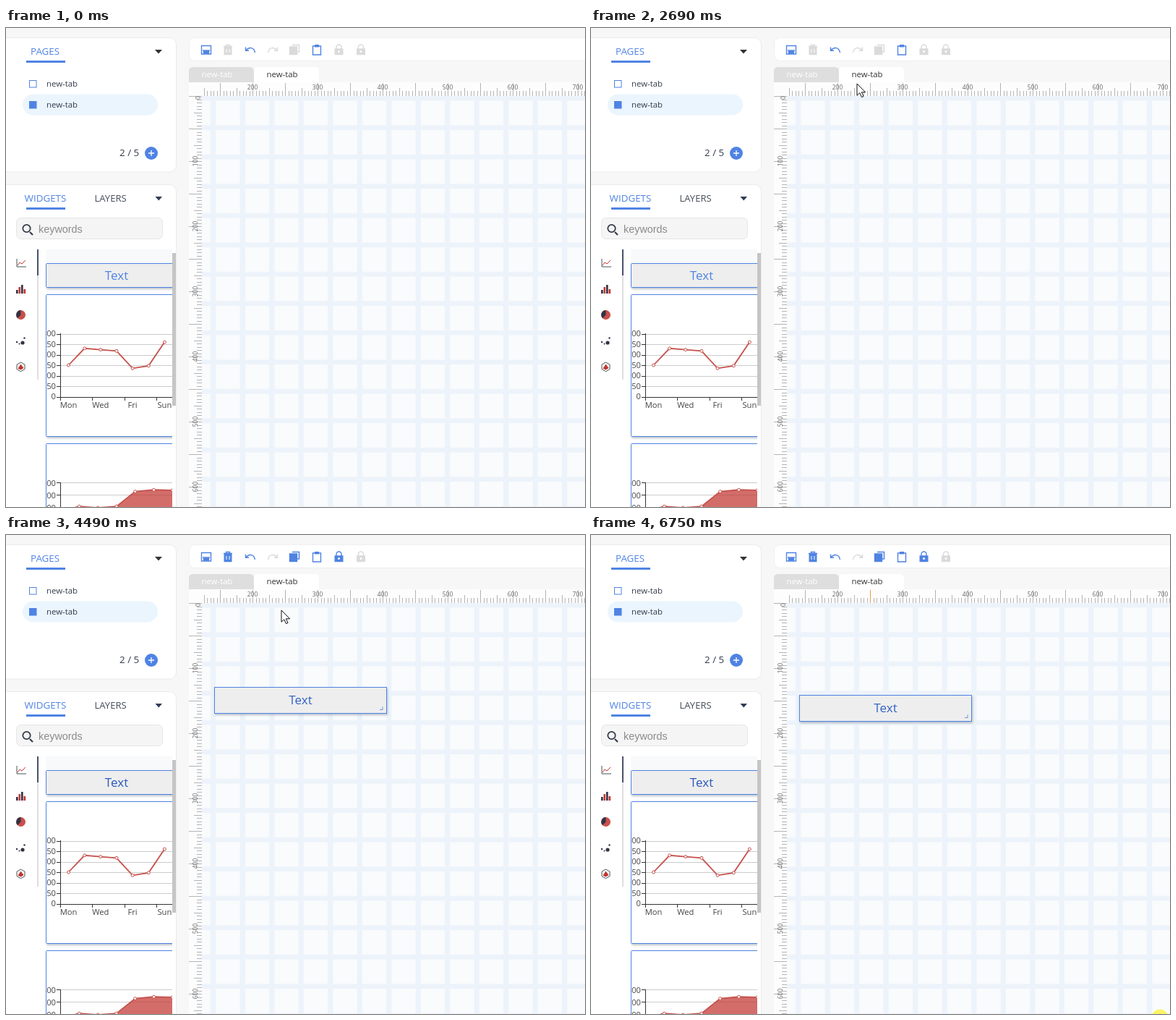
An HTML page that plays this animation: 801x662 px, repeating every 6880 ms.

```html
<!DOCTYPE html>
<html lang="en">
<head>
<meta charset="utf-8">
<title>Dashboard editor</title>
<style>
  html, body { margin: 0; width: 100%; height: 100%; overflow: hidden; background: #f7f7f7; }
  svg { display: block; position: absolute; left: 0; top: 0; }
  text { font-family: "Open Sans", "Noto Sans", "Noto Sans CJK TC", "Noto Sans CJK JP", sans-serif; }
  .crisp { shape-rendering: crispEdges; }
  .off { display: none; }
  .icon { fill: none; stroke: currentColor; stroke-width: 1.4; }
  .tool { color: #4f83e3; }
  .dim { color: #dadada; }
</style>
</head>
<body>
<svg id="stage" width="801" height="662" viewBox="0 0 801 662">
  <defs>
    <pattern id="grid" x="290.3" y="100.5" width="40.5" height="40.5" patternUnits="userSpaceOnUse">
      <rect width="40.5" height="40.5" fill="#edf3fa"/>
      <rect width="33.4" height="34" fill="#f9fbfd"/>
    </pattern>
    <clipPath id="listClip"><rect x="55" y="300" width="175" height="362"/></clipPath>
    <clipPath id="lineClip"><rect x="331" y="182" width="234" height="195"/></clipPath>
    <clipPath id="barClip"><rect x="331" y="386" width="234" height="153"/></clipPath>
    <filter id="shadow" x="-10%" y="-20%" width="120%" height="160%">
      <feDropShadow dx="1" dy="2" stdDeviation="1.5" flood-color="#456" flood-opacity=".35"/>
    </filter>
  </defs>
  <g id="panels"></g>
  <g id="list" clip-path="url(#listClip)"></g>
  <g id="tools"></g>
  <g id="tabs"></g>
  <g id="canvas"></g>
  <g id="rulers" class="crisp"></g>
  <g id="page1">
    <g id="charts"></g>
  </g>
  <g id="widget"></g>
  <g id="ghost" opacity=".6"></g>
  <circle id="halo" r="11.5" fill="#fdf23c" opacity=".78"/>
  <path id="arrow" d="M0 0V16.2L3.8 12.7L6.5 18.6L9 17.5L6.4 11.8H11.6Z" fill="#fff" stroke="#111" stroke-linejoin="round"/>
  <path id="hand" d="M-2 1Q0-2 2 1V7Q4 5.500 5 8Q7 6.500 8 9Q10.500 8 10.500 11V15Q9.500 17 8.500 21H-1Q-3 17-6 13Q-6.500 9.500-2 13Z" fill="#fff" stroke="#111" stroke-width="1.2" stroke-linejoin="round"/>
</svg>
<script>
const LOOP = 6880;
const BLUE = '#4f83e3';
const COLORS = ['#c23531', '#2f4554', '#61a0a8', '#d48265', '#91c7ae'];
const $ = id => document.getElementById(id);
const range = n => Array.from({ length: n }, (_, i) => i);
const mix = (a, b, p) => a + (b - a) * p;

const text = (s, x, y, size, fill, more = '') =>
  `<text x="${x}" y="${y}" font-size="${size}" fill="${fill}" ${more}>${s}</text>`;
const mid = 'text-anchor="middle"', end = 'text-anchor="end"';
const rect = (x, y, w, h, fill, more = '') =>
  `<rect x="${x}" y="${y}" width="${w}" height="${h}" fill="${fill}" ${more}/>`;
const line = (x1, y1, x2, y2, stroke, more = '') =>
  `<path d="M${x1} ${y1}L${x2} ${y2}" stroke="${stroke}" ${more}/>`;
const path = (d, more = '') => `<path d="${d}" ${more}/>`;
const poly = (pts, color, r, width = 1.8) =>
  `<polyline points="${pts.join(' ')}" fill="none" stroke="${color}" stroke-width="${width}"/>` +
  pts.map(([x, y]) => `<circle cx="${x}" cy="${y}" r="${r}" fill="#fff" stroke="${color}"/>`).join('');
const icon = (x, y, d, more = 'class="icon"') =>
  `<g transform="translate(${x} ${y})" ${more}>${d}</g>`;

const TRASH = path('M-6-4.500H6M-2.500-4.500V-6.500H2.500V-4.500') +
  path('M-4.800-3.500H4.800V6.500H-4.800Z', 'fill="currentColor"') +
  path('M-2-1V4M2-1V4', 'stroke="#fff" stroke-width="1"');
const LOCK = path('M-3.500-1V-3.500A3.500 3.500 0 0 1 3.500-3.500V-1') +
  rect(-5.3, -1, 10.6, 7.5, 'currentColor') + `<circle cy="2.600" r="1.500" fill="#fff" stroke="none"/>`;
const UNDO = path('M-6.500-3.500L-6.500 1.200L-2 1.200M-6 1C-2-4 5-4 6.500 4');

function pageRow(id, y) {
  return `<g id="${id}">` +
    rect(23, y - 14.5, 187, 29, '#ebf5fe', 'rx="14.5" class="bg"') +
    rect(32.5, y - 4.5, 9.5, 9.5, '#fff', `stroke="${BLUE}" class="box"`) +
    text('new-tab', 56, y + 4, 11.4, '#333b4a') + '</g>';
}

function buildPanels() {
  const frame = 'stroke="#ebebeb" rx="9"';
  const categories =
    path('M15 319V330H28', 'fill="none" stroke="#455"') +
    path('M16 328L19 324L22 326L27 321', 'fill="none" stroke="#c23531"') +
    [[14, 5], [17.5, 9], [21, 12], [24.5, 6]].map(([x, h], i) =>
      rect(x, 367 - h, 2.6, h, i % 2 ? '#c23531' : '#334')).join('') +
    '<circle cx="20.500" cy="396.500" r="6.500" fill="#c9504b"/>' +
    path('M20.500 396.500V390A6.500 6.500 0 0 0 16 401Z', 'fill="#334"') +
    [[15, 434, 1.2], [18.5, 436.5, 1], [23, 435, 2.6], [25.5, 428.500, 1.2]].map(([x, y, r], i) =>
      `<circle cx="${x}" cy="${y}" r="${r}" fill="#334"/>`).join('') +
    path('M20.500 462L26 465.200V471.500L20.500 474.700L15 471.500V465.200Z', 'fill="#fff" stroke="#455"') +
    path('M20.500 464.500L24.500 470L20.500 472.500L16.500 470.500Z', 'fill="#c23531"');
  $('panels').innerHTML =
    rect(-20, 13.5, 255.5, 185.5, '#fff', frame) + rect(-20, 216.5, 255.5, 480, '#fff', frame) +
    text('PAGES', 34, 37, 13.4, BLUE) + rect(28, 45, 54, 3, BLUE) +
    path('M206 30H216L211 35.500Z', 'fill="#333"') +
    pageRow('row1', 77) + pageRow('row2', 106) +
    `<g id="rowIcons" style="color:${BLUE}">` +
    icon(165, 77, path('M-5.500 6L-4.500 2.500L3-5L5.500-2.500L-2 5Z', 'fill="currentColor" stroke="none"')) +
    icon(192, 77.5, TRASH, 'class="icon" stroke-width="1.200"') + '</g>' +
    text('2 / 5', 157, 177, 13.4, '#333b4a') +
    `<circle cx="201" cy="173" r="9" fill="${BLUE}"/>` + path('M197 173H205M201 169V177', 'stroke="#fff" stroke-width="1.300"') +
    text('WIDGETS', 25.5, 240, 13.4, BLUE) + text('LAYERS', 122.5, 240, 13.1, '#444b58') +
    rect(28, 248, 54, 3, BLUE) + path('M206.500 233H216L211.300 238.500Z', 'fill="#333a55"') +
    rect(14.5, 262.5, 202, 29, '#f5f5f5', 'stroke="#e6e6e6" rx="6"') +
    path('M33 282L37 286', 'stroke="#333a48" stroke-width="2.200"') +
    '<circle cx="28.500" cy="277" r="5.200" fill="none" stroke="#333a48" stroke-width="1.800"/>' +
    `<text x="45" y="283" font-size="14.400" fill="#8b8b8b" style="font-family:'Liberation Sans',Arial,sans-serif">keywords</text>` +
    categories + rect(43, 306, 2, 180, '#dfdfdf') + rect(43, 306, 2, 36, '#4a5468') +
    rect(230, 311, 5, 211, '#c5c5c5');
}

function buildList() {
  const card = (y, h, fill) => rect(55.5, y + .5, 250, h, fill, `stroke="${BLUE}" rx="1" filter="url(#shadow)"`);
  const axis = (top, ys, bottom) =>
    ys.map(y => line(75, y, 230, y, '#ccc')).join('') +
    ys.concat(bottom < 600 ? bottom : []).map(y => line(70, y, 75, y, '#333')).join('') +
    line(75.5, top, 75.5, bottom, '#333');
  const y1 = v => 509.5 - v * .29, y2 = v => 715 - v * .0577;
  const week = [150, 230, 224, 218, 135, 147, 260].map((v, i) => [86.5 + i * 22.15, y1(v)]);
  const area = [820, 932, 901, 934, 1290, 1330, 1320].map((v, i) => [75.5 + i * 25.8, y2(v)]);
  const marks = [300, 250, 200, 150, 100, 50];
  $('list').innerHTML =
    rect(55, 306, 175, 19, '#f8f9fa') +
    `<g id="item">${card(325, 33, '#eee')}${text('Text', 153, 348, 17, BLUE, mid + ' id="itemText"')}</g>` +
    rect(58, 325.5, 200, 32.5, '#adbfe9', `id="picked" stroke="${BLUE}" filter="url(#shadow)"`) +
    text('Text', 153.5, 348, 17, '#5d83d8', mid + ' id="pickedText" stroke="#d3def6" stroke-width=".4"') +
    card(368, 196, '#fff') +
    `<g class="crisp">${axis(422, marks.map(v => Math.round(y1(v)) + .5), 510)}` +
    line(75, 510.5, 230, 510.5, '#333') +
    range(4).map(i => line(75.5 + i * 44.3, 510, 75.5 + i * 44.3, 515, '#333')).join('') + '</g>' +
    marks.concat(0).map(v => text(v, 69, y1(v) + 3.7, 11.2, '#444', end)).join('') +
    ['Mon', 'Wed', 'Fri', 'Sun'].map((d, i) => text(d, 86.5 + i * 44.3, 525, 11.2, '#444', mid)).join('') +
    poly(week, '#c6524d', 2) +
    card(574, 120, '#fff') +
    `<g class="crisp">${axis(628, [628.5, 645.5, 662.5], 700)}</g>` +
    ['1,500', '1,200', '900'].map((s, i) => text(s, 69, 632.5 + i * 17, 11.2, '#444', end)).join('') +
    path('M' + area.map(p => p.join(' ')).join('L') + 'V720H75.500Z', 'fill="#c23531" fill-opacity=".72"') +
    poly(area, '#c6524d', 2);
}

function buildTools() {
  const tool = (x, d, kind) => icon(x, 30, d, `class="icon ${kind}"`);
  const copy = path('M-3-6.500H6.500V3H4', 'stroke-width="1.500"') + rect(-6.5, -4, 10, 10.5, 'currentColor');
  $('tools').innerHTML = rect(253.5, 13.5, 600, 32, '#fff', 'rx="8" stroke="#efefef"') +
    tool(277, path('M-6.500-5.500H6.500V6H-6.500Z') + rect(-3.5, 2, 7, 3, 'currentColor') + path('M-5 1H5'), 'tool') +
    tool(307, TRASH, 'dim sel') + tool(338, UNDO, 'tool') +
    `<g transform="translate(738 0) scale(-1 1)">${tool(369, UNDO, 'dim')}</g>` +
    tool(399, copy, 'dim sel') +
    tool(430, path('M-5.500-5H5.500V7H-5.500Z') + rect(-3, -7, 6, 3.5, 'currentColor', 'stroke="none"'), 'tool') +
    tool(460.5, LOCK, 'dim sel') + tool(491, LOCK, 'dim');
}

function buildStage() {
  $('tabs').innerHTML = [253, 343].map((x, i) =>
    `<g id="tab${i + 1}">` + path(`M${x} 76V60Q${x} 54 ${x + 6} 54H${x + 84}Q${x + 90} 54 ${x + 90} 60V76Z`) +
    text('new-tab', x + 17.5, 68, 11.4, '#333') + '</g>').join('');
  $('canvas').innerHTML = rect(253, 75, 548, 587, '#fdfdfd') + rect(271, 94, 530, 568, 'url(#grid)');

  const size = i => i % 10 == 0 ? 18 : i % 5 == 0 ? 11 : 7;
  let d = '', labels = '';
  for (let i = 5; i < 123; i++) d += `M${Math.round(251 + i * 4.5) + .5} 94v-${size(i)}`;
  for (let i = 0; i < 127; i++) d += `M271 ${Math.round(94 + i * 4.5) + .5}h-${size(i)}`;
  for (let n = 1; n < 7; n++) {
    labels += text((n + 1) * 100, 251 + n * 90, 85, 8.4, '#666', mid);
    labels += text(n * 100, 0, 0, 8.4, '#666', mid + ` transform="translate(265 ${94 + n * 90}) rotate(-90)"`);
  }
  labels += text('0', 0, 0, 8.4, '#666', `transform="translate(269 99) rotate(-90)"`);
  $('rulers').innerHTML = path(d, 'stroke="#b4b4b4"') + labels +
    line(386.5, 76, 386.5, 94, '#e5a14a', 'id="mark"');

  const corner = (x, y) => path(`M${x} ${y}h4v-4`, 'fill="none" stroke="#9db4d8"');
  $('page1').insertAdjacentHTML('afterbegin',
    rect(331, 142, 234, 33, '#eee') + text('今日分析', 448, 163.5, 16, '#3f6fce', mid) + corner(558.5, 171.5) +
    rect(331, 182, 234, 195, '#fff') + rect(331, 386, 234, 153, '#fff', 'opacity=".55"') +
    icon(336, 391.5, path('M-2.500-1V-3A2.500 2.500 0 0 1 2.500-3V-1M-4-1H4V4H-4ZM0 .500V2.500', 'stroke="#aaa" stroke-width="1"')));
  $('page1').insertAdjacentHTML('beforeend', buildLegend() + corner(558.5, 372.5));

  $('widget').innerHTML = rect(.5, .5, 238, 36, '#eee', `stroke="${BLUE}" filter="url(#shadow)"`) +
    text('Text', 119.5, 24.3, 17, '#3263c4', mid) + path('M229 31.500h4v-4', 'fill="none" stroke="#6f93d6"');
  $('ghost').innerHTML = rect(0, 0, 196, 34, '#e9eaec', `stroke="${BLUE}"`) + text('Text', 98, 23, 17, BLUE, mid);
}

function buildLegend() {
  const names = ['郵件營銷', '聯盟廣告', '視頻廣告', '直接訪問', '搜索引擎'];
  return names.map((s, i) => {
    const x = 374 + i % 2 * 79, y = 192.5 + (i >> 1) * 20;
    return line(x, y, x + 22, y, COLORS[i], 'stroke-width="1.600"') +
      `<circle cx="${x + 11}" cy="${y}" r="5.300" fill="#fff" stroke="${COLORS[i]}" stroke-width="1.500"/>` +
      text(s, x + 26, y + 3.5, 10.8, '#333');
  }).join('') +
    text('折線圖堆疊', 335, 201, 16.2, '#333', 'font-weight="700"') +
    path('M552.500 190V200M548.500 196.500L552.500 200.500L556.500 196.500M546 199V203.500H559V199', 'fill="none" stroke="#777" stroke-width="1.100"');
}

// Axes glide into place (p: 0 to 1) while the stacked lines are already settled.
function drawCharts(p) {
  const x0 = mix(451, 373.5, p), base = mix(275, 352.5, p), step = mix(300, 30.4, p), top = 237.5;
  let out = '<g clip-path="url(#lineClip)">';
  for (let i = 0; i <= 6; i++) {
    const y = Math.round(mix(base, top, i / 6)) + .5;
    out += line(x0, y, 565, y, i ? '#d2d2d2' : '#333') + line(x0 - 5, y, x0, y, '#333') +
      text((i * 500).toLocaleString('en-US'), x0 - 7, y + 3.5, 11, '#444', end);
  }
  out += line(x0, top, x0, base, '#333');
  [...'一二三四五六日'].forEach((c, i) => {
    const x = x0 + i * step;
    out += line(x, base, x, base + 5, '#333') + text('周' + c, x, base + 16.5, 10.8, '#333', mid);
  });
  const sum = Array(7).fill(0);
  [[120, 132, 101, 134, 90, 230, 210], [220, 182, 191, 234, 290, 330, 310],
   [150, 232, 201, 154, 190, 330, 410], [320, 332, 301, 334, 390, 330, 320],
   [820, 932, 901, 934, 1290, 1330, 1320]].forEach((row, k) => {
    out += poly(row.map((v, i) => [373.5 + i * 30.4, 352.5 - (sum[i] += v) * .0385]), COLORS[k], 1.4, 1.6);
  });

  const bx = mix(617, 354.5, p), bTop = mix(426, 438.5, p), bBase = mix(450, 485.5, p), band = mix(288, 26.85, p);
  out += '</g><g clip-path="url(#barClip)">' + rect(bx, bTop, band * 7, bBase - bTop, '#f5f6f5');
  for (let i = 0; i <= 4; i++) {
    const y = Math.round(mix(bBase, bTop, i / 4)) + .5;
    out += line(bx - 5, y, bx, y, '#aaa') + line(bx, y, bx + band * 7, y, i ? '#e4e4e4' : '#aaa') +
      text(i * 50, bx - 7, y + 3.5, 11, '#b3b3b3', end);
  }
  out += line(bx, bTop, bx, bBase + 4, '#aaa');
  [120, 200, 150, 80, 70, 110, 130].forEach((v, i) => {
    const h = v / 200 * (bBase - bTop);
    out += rect(bx + band * (i + .1), bBase - h, band * .8, h, '#dd9795');
    if (i % 2 == 0) out += line(bx + band * i, bBase, bx + band * i, bBase + 4, '#aaa') +
      text(['Mon', 'Wed', 'Fri', 'Sun'][i / 2], bx + band * (i + .5), bBase + 14.5, 11, '#b3b3b3', mid);
  });
  $('charts').innerHTML = out + '</g>';
}

// Pointer stops: time, x, y
const PATH = [
  [130, 543, 452], [750, 82, 76], [900, 70, 79], [1570, 70, 79], [2200, 382, 63], [2480, 382, 63],
  [2690, 368, 77], [3150, 150, 342], [3250, 150, 342], [3580, 424, 238], [3720, 405, 269.5],
  [3800, 405, 269.5], [3920, 400, 238], [4130, 359, 227], [4350, 385, 92], [4490, 381, 104],
  [4740, 292, 63], [5250, 292, 63], [5600, 382, 63], [5850, 382, 63], [6480, 766, 638], [6720, 787, 667], [6880, 787, 667]];
const PRESS = [[960, 1300], [2220, 2340], [3190, 3580], [3880, 4130], [4970, 5080], [5740, 5850], [6700, 6880]];
const VIEWS = [[1160, 2270], [5060, 5780]];

function pointer(t) {
  const i = Math.max(1, PATH.findIndex(s => s[0] >= t));
  const [a, b] = [PATH[i - 1], PATH[i]];
  const u = Math.max(0, (t - a[0]) / (b[0] - a[0])), e = u * u * (3 - 2 * u);
  return [mix(a[1], b[1], e), mix(a[2], b[2], e)];
}
const within = (t, spans) => spans.find(([a, b]) => t >= a && t < b);
const show = (id, on) => $(id).classList.toggle('off', !on);
const place = (id, x, y) => $(id).setAttribute('transform', `translate(${x} ${y})`);

let lastP = -1;
function render(t) {
  const [x, y] = pointer(t), view = within(t, VIEWS), first = !!view;
  const overTab = y > 54 && y < 75 && x > 253 && x < 433;

  [1, 2].forEach(n => {
    const active = first == (n == 1);
    const row = $('row' + n), tab = $('tab' + n);
    row.querySelector('.bg').classList.toggle('off', !active);
    row.querySelector('.box').setAttribute('fill', active ? BLUE : '#fff');
    tab.firstChild.setAttribute('fill', active ? '#fff' : '#dedede');
    tab.lastChild.setAttribute('fill', active ? '#333' : '#fff');
  });
  show('rowIcons', t > 750 && x < 210 && y > 63 && y < 92);

  show('page1', first);
  if (view) {
    const u = Math.min(1, (t - view[0]) / 350), p = 1 - (1 - u) ** 3;
    if (p != lastP) drawCharts(lastP = p);
  }

  const placed = t >= 3580 && !first;
  document.querySelectorAll('.sel').forEach(e => {
    e.classList.toggle('dim', !placed);
    e.classList.toggle('tool', placed);
  });
  show('widget', placed);
  if (t < 3920) place('widget', 329, 221);
  else if (t < 4130) place('widget', x - 71, y - 17);
  else place('widget', 288, t < 5060 ? 210 : 221);

  const picked = t >= 3250 && t < 4130;
  show('picked', picked);
  show('pickedText', picked);
  show('item', !picked);
  $('itemText').setAttribute('fill', t < 4130 ? BLUE : '#2a58bd');
  show('ghost', t >= 3250 && t < 3580);
  place('ghost', x - 95, y - 17);
  show('mark', t >= 5780);

  show('halo', within(t, PRESS));
  show('arrow', t >= 130 && !overTab);
  show('hand', t >= 130 && overTab);
  ['halo', 'arrow', 'hand'].forEach(id => place(id, x, y));
}

buildPanels();
buildList();
buildTools();
buildStage();
const start = performance.now();
(function tick() {
  render((performance.now() - start) % LOOP);
  requestAnimationFrame(tick);
})();
</script>
</body>
</html>
```
